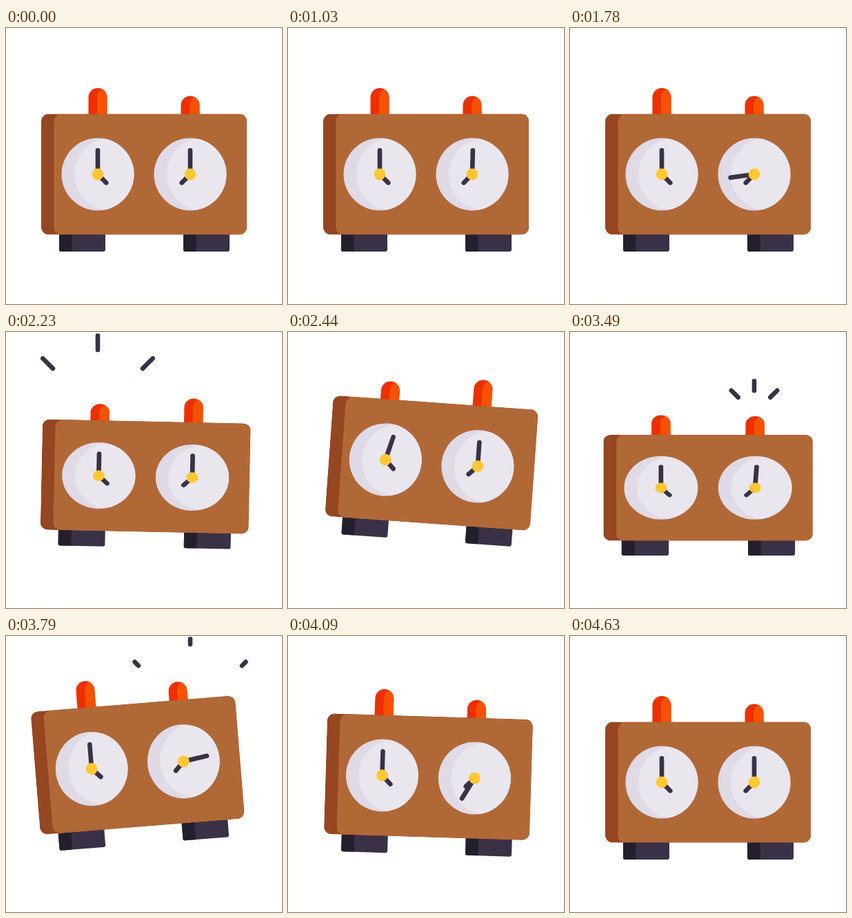
An HTML page that plays this animation: 400x400 px, repeating every 4660 ms.

```html
<!DOCTYPE html>
<html lang="en">
<head>
<meta charset="utf-8">
<title>Chess clock</title>
<style>
  html, body { margin: 0; width: 100%; height: 100%; overflow: hidden; background: #fff; }
  svg { display: block; width: 100vw; height: 100vh; }
  .ink { stroke: #3a3146; stroke-width: 6.6; stroke-linecap: round; fill: none; }
</style>
</head>
<body>
<svg viewBox="0 0 400 400">
  <defs>
    <clipPath id="cBody"><rect x="51" y="124.5" width="298" height="175" rx="11"/></clipPath>
    <clipPath id="cFace"><circle r="52.5"/></clipPath>
    <clipPath id="cKnob"><rect x="-13.5" width="27" height="70" rx="13.5"/></clipPath>
    <g id="knob">
      <rect x="-13.5" width="27" height="70" rx="13.5" fill="#ee2f00"/>
      <rect x="-1" width="27" height="70" rx="13.5" fill="#f55200" clip-path="url(#cKnob)"/>
    </g>
    <g id="face">
      <circle r="52.5" fill="#dfdae6"/>
      <g clip-path="url(#cFace)"><circle cx="18.5" r="52.5" fill="#eae6ee"/></g>
    </g>
    <g id="foot">
      <path d="M0 0H67V22Q67 25 64 25H3Q0 25 0 22Z" fill="#3a3146"/>
      <path d="M0 0H18.5V25H3Q0 25 0 22Z" fill="#241f2d"/>
    </g>
  </defs>
  <path id="sparks" class="ink"/>
  <g id="clock">
    <use href="#foot" x="77" y="299"/>
    <use href="#foot" x="257" y="299"/>
    <use href="#knob" id="knobL"/>
    <use href="#knob" id="knobR"/>
    <g clip-path="url(#cBody)">
      <rect x="51" y="124.5" width="298" height="175" fill="#964621"/>
      <rect x="69.5" y="124.5" width="298" height="175" rx="11" fill="#b16837"/>
    </g>
    <g transform="translate(133 212)">
      <use href="#face"/>
      <path class="ink" d="M0 0L12.3 12.3"/>
      <path class="ink" id="handL" d="M0 0V-34.7"/>
      <circle r="8.4" fill="#ffc832"/>
    </g>
    <g transform="translate(267 212)">
      <use href="#face"/>
      <path class="ink" d="M0 0L-12.3 12.3"/>
      <path class="ink" id="handR" d="M0 0V-34.7"/>
      <circle r="8.4" fill="#ffc832"/>
    </g>
  </g>
</svg>
<script>
const LOOP = 4660, REST = 1030, STEP = 30;
const PRESS = 1850, GAP = 1480; // first press, delay to the second
const $ = id => document.getElementById(id);

// Curves in ms after a press: [time, value]
const squash = [[0, 0], [160, .123], [230, .155], [268, .18], [320, .145], [380, .085], [480, -.03], [620, 0]];
const lift = [[310, 0], [380, 12], [500, 25], [590, 22], [760, 8], [800, 5.8], [830, 3.7], [885, 0]];
const tilt = [[330, 0], [380, 1.2], [515, 6], [640, 2.2], [760, -1.75], [795, -2.8], [830, -1.75], [885, 0]];
const outer = [[125, 20], [160, 47], [230, 88.5], [370, 112], [400, 113.7], [540, 113.7]];
const inner = [[125, 20], [160, 33], [230, 62], [380, 92], [540, 113.7]];

const smooth = (t, a, b) => {
  const x = Math.min(1, Math.max(0, (t - a) / (b - a)));
  return x * x * (3 - 2 * x);
};

// Monotone cubic curve through a list of points
function curve(pts, t) {
  const n = pts.length - 1;
  if (t <= pts[0][0]) return pts[0][1];
  if (t >= pts[n][0]) return pts[n][1];
  const slope = i => (pts[i + 1][1] - pts[i][1]) / (pts[i + 1][0] - pts[i][0]);
  const tangent = i => {
    if (i === 0 || i === n) return 0;
    const a = slope(i - 1), b = slope(i);
    return a * b <= 0 ? 0 : 2 * a * b / (a + b);
  };
  let i = 0;
  while (t > pts[i + 1][0]) i++;
  const h = pts[i + 1][0] - pts[i][0], x = (t - pts[i][0]) / h;
  const s = x * x * (3 - 2 * x);
  return pts[i][1] * (1 - s) + pts[i + 1][1] * s
    + h * x * (1 - x) * ((1 - x) * tangent(i) - x * tangent(i + 1));
}

function sparkPath(cx, t) {
  if (t <= 125 || t >= 540) return "";
  const a = curve(inner, t), b = curve(outer, t);
  return [-1, 0, 1].map(k => {
    const dx = Math.sin(k * Math.PI / 4), dy = Math.cos(k * Math.PI / 4);
    return `M${cx + dx * a} ${118 - dy * a}L${cx + dx * b} ${118 - dy * b}`;
  }).join("");
}

function draw(t) {
  const second = t >= PRESS + GAP;
  const e = t - PRESS - (second ? GAP : 0);
  const side = second ? -1 : 1;

  const q = curve(squash, e);
  $("clock").setAttribute("transform",
    `translate(200 ${324 - curve(lift, e)}) rotate(${side * curve(tilt, e)}) ` +
    `scale(${1 + q * .142} ${1 - q}) translate(-200 -324)`);

  const swap = smooth(e, 75, 230), down = second ? 1 - swap : swap;
  $("knobL").setAttribute("transform", `translate(133 ${87 + 11.5 * down})`);
  $("knobR").setAttribute("transform", `translate(267 ${98.5 - 11.5 * down})`);

  $("handL").setAttribute("transform", `rotate(${360 * smooth(t, 2293, 3490)})`);
  $("handR").setAttribute("transform",
    `rotate(${360 * (smooth(t, 985, 2195) + smooth(t, 3417, 4627))})`);
  $("sparks").setAttribute("d", sparkPath(second ? 267 : 133, e));
}

const start = performance.now();
function tick() {
  const t = (performance.now() - start) % LOOP;
  draw(t < REST ? 0 : REST + Math.floor((t - REST) / STEP) * STEP);
  requestAnimationFrame(tick);
}
tick();
</script>
</body>
</html>
```
